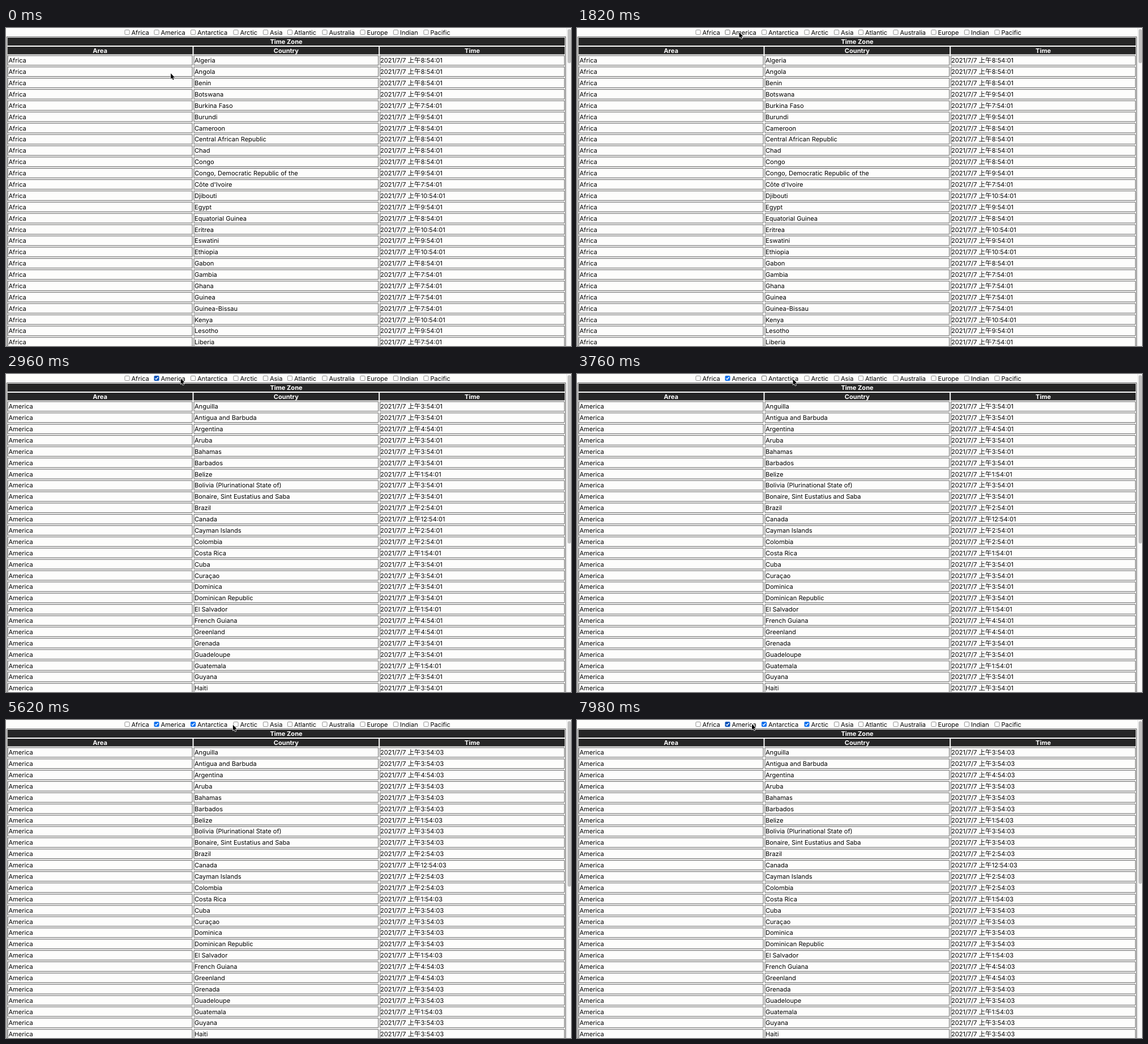
These frames come from a looping animation (998x561 px, 8000 ms). An HTML page with a canvas:

```html
<!DOCTYPE html>
<html lang="en">
<head>
<meta charset="utf-8">
<title>Time Zone</title>
<style>
  html, body { margin: 0; width: 100%; height: 100%; overflow: hidden; background: #fff; }
  canvas { display: block; width: 998px; height: 561px; }
</style>
</head>
<body>
<canvas id="stage" width="998" height="561"></canvas>
<script>
const ctx = document.getElementById('stage').getContext('2d');
ctx.textRendering = 'geometricPrecision';

const LOOP = 8000;
const FONT = '11.05px Inter, "Noto Sans CJK TC", "Noto Sans CJK SC", "Noto Sans CJK JP", sans-serif';
const CJK_FONT = '11.6px "Noto Sans CJK TC", "Noto Sans CJK SC", "Noto Sans CJK JP", sans-serif';
const PAPER = '#fdfdfc', DARK = '#262626', BORDER = '#5c5c5c';
const ROW_TOP = 48.3, ROW_PITCH = 19.88, COLUMN_PITCH = 328.7, GAP = 2;

const parse = list => list.split('|').map(entry => entry.split(':'));
const zones = {
  Africa: parse("Algeria:8|Angola:8|Benin:8|Botswana:9|Burkina Faso:7|Burundi:9|Cameroon:8|" +
    "Central African Republic:8|Chad:8|Congo:8|Congo, Democratic Republic of the:9|Côte d'Ivoire:7|" +
    "Djibouti:10|Egypt:9|Equatorial Guinea:8|Eritrea:10|Eswatini:9|Ethiopia:10|Gabon:8|Gambia:7|" +
    "Ghana:7|Guinea:7|Guinea-Bissau:7|Kenya:10|Lesotho:9|Liberia:7"),
  America: parse("Anguilla:3|Antigua and Barbuda:3|Argentina:4|Aruba:3|Bahamas:3|Barbados:3|Belize:1|" +
    "Bolivia (Plurinational State of):3|Bonaire, Sint Eustatius and Saba:3|Brazil:2|Canada:12|" +
    "Cayman Islands:2|Colombia:2|Costa Rica:1|Cuba:3|Curaçao:3|Dominica:3|Dominican Republic:3|" +
    "El Salvador:1|French Guiana:4|Greenland:4|Grenada:3|Guadeloupe:3|Guatemala:1|Guyana:3|Haiti:3")
};

// label, text x, time it gets ticked
const filters = [
  ['Africa', 221.5], ['America', 273.5, 2060], ['Antarctica', 338, 4560], ['Arctic', 413.5, 6160],
  ['Asia', 466], ['Atlantic', 509], ['Australia', 570.5], ['Europe', 637.5], ['Indian', 696], ['Pacific', 749.5]
];
const columns = [0, 1, 2].map(i => 2.8 + i * COLUMN_PITCH);
const cellWidth = COLUMN_PITCH - GAP;

// time, x, y of the pointer tip
const path = [
  [0, 291, 80], [300, 291, 80], [1500, 286.5, 7.5], [1820, 286.5, 7.5], [2050, 290, 7.5], [2700, 290, 7.5],
  [3600, 381.5, 9], [3800, 381.5, 9], [4300, 375.5, 8.5], [5100, 375.5, 8.5], [5950, 413.5, 8.5],
  [6900, 413.5, 8.5], [7980, 309, 7], [LOOP, 309, 7]
];

function pointerAt(t) {
  const i = Math.max(1, path.findIndex(p => p[0] >= t));
  const [t0, x0, y0] = path[i - 1], [t1, x1, y1] = path[i];
  const u = (t - t0) / (t1 - t0), k = u * u * (3 - 2 * u);
  return [x0 + (x1 - x0) * k, y0 + (y1 - y0) * k];
}

function text(str, x, y, { font = FONT, color = '#000', align = 'left' } = {}) {
  ctx.font = font;
  ctx.fillStyle = color;
  ctx.textAlign = align;
  ctx.fillText(str, x, y);
  return ctx.measureText(str).width;
}

function rect(x, y, w, h, color) {
  ctx.fillStyle = color;
  ctx.fillRect(x, y, w, h);
}

function frame(x, y, w, h) {
  ctx.strokeStyle = BORDER;
  ctx.lineWidth = 1;
  ctx.strokeRect(x + .5, y + .5, w - 1, h - 1);
}

function rounded(x, y, w, h, r) {
  ctx.beginPath();
  ctx.roundRect(x, y, w, h, r);
}

function checkbox(x, checked, hover) {
  if (checked) {
    rounded(x, 3, 9, 9, 1.8);
    ctx.fillStyle = hover ? '#0550b8' : '#0b6fee';
    ctx.fill();
    ctx.beginPath();
    ctx.moveTo(x + 1.9, 7.7);
    ctx.lineTo(x + 3.7, 9.5);
    ctx.lineTo(x + 7.1, 5.2);
    ctx.strokeStyle = '#fff';
    ctx.lineWidth = 1.4;
  } else {
    rounded(x + .4, 3.4, 8.2, 8.2, 1.7);
    ctx.strokeStyle = hover ? '#4f4f4f' : '#767676';
    ctx.lineWidth = .8;
  }
  ctx.stroke();
}

function drawFilters(t, [px, py]) {
  for (const [label, x, tick = Infinity] of filters) {
    const width = text(label, x, 12);
    const hover = py < 15 && px >= x - 12 && px <= x + width;
    checkbox(x - 12, t >= tick, hover);
  }
}

function drawHeader() {
  const style = { font: 'bold ' + FONT, color: '#fff', align: 'center' };
  frame(1, 15, 988, 560);
  rect(columns[0], 17, 2 * COLUMN_PITCH + cellWidth, 14, DARK);
  text('Time Zone', 495, 27.8, style);
  ['Area', 'Country', 'Time'].forEach((title, i) => {
    rect(columns[i], 33, cellWidth, 13.5, DARK);
    text(title, columns[i] + cellWidth / 2, 43.5, style);
  });
}

function drawTime(hour, second, y) {
  let x = 661;
  x += text('2021/7/7 ', x, y);
  x += text('上午', x, y, { font: CJK_FONT });
  text(`${hour}:54:${second}`, x, y);
}

function drawRows(area, second) {
  zones[area].forEach(([country, hour], i) => {
    const y = ROW_TOP + i * ROW_PITCH, baseline = y + 13;
    for (const x of columns) frame(x, y, cellWidth, ROW_PITCH - GAP);
    text(area, 4.5, baseline);
    text(country, 333, baseline);
    drawTime(hour, second, baseline);
  });
}

function drawScrollbar(bottom) {
  rect(990, 0, 8, 561, '#fafafa');
  rect(990, 0, 1, 561, '#e8e8e8');
  rounded(992, 2, 6, bottom - 2, 3);
  ctx.fillStyle = '#c1c1c1';
  ctx.fill();
}

function drawPointer([x, y]) {
  const arrow = [[0, 0], [0, 10], [2.3, 7.9], [3.8, 11.6], [5.5, 10.9], [3.9, 7.3], [7, 7.2]];
  ctx.beginPath();
  arrow.forEach(([dx, dy]) => ctx.lineTo(x + dx, y + dy));
  ctx.closePath();
  ctx.lineJoin = 'round';
  ctx.strokeStyle = '#fff';
  ctx.lineWidth = 1.4;
  ctx.stroke();
  ctx.fillStyle = '#000';
  ctx.fill();
}

function draw(now) {
  const t = now % LOOP;
  const pointer = pointerAt(t);
  const ticked = filters.filter(f => t >= f[2]).length;
  rect(0, 0, 998, 561, PAPER);
  drawFilters(t, pointer);
  drawHeader();
  drawRows(ticked ? 'America' : 'Africa', ticked > 1 ? '03' : '01');
  drawScrollbar([62, 299, 294, 289][ticked]);
  drawPointer(pointer);
  requestAnimationFrame(draw);
}
requestAnimationFrame(draw);
</script>
</body>
</html>
```
